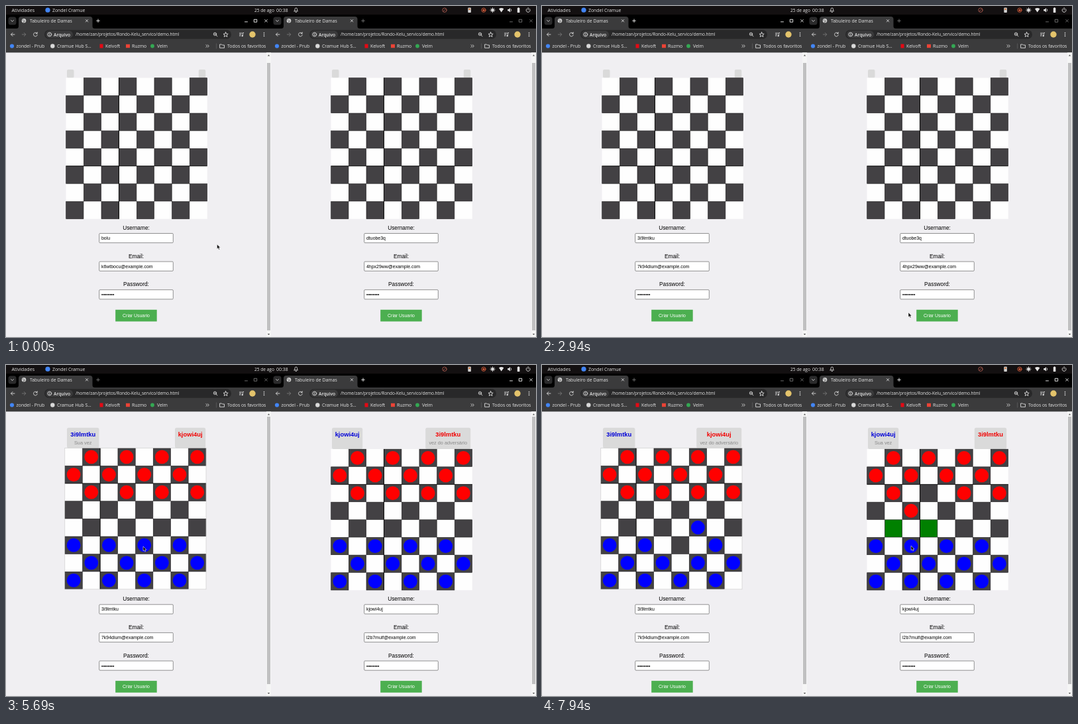
Write an HTML page that moves like this. It is 800x500 px and loops after 8000 ms.

```html
<!DOCTYPE html>
<html lang="pt">
<head>
<meta charset="utf-8">
<title>Tabuleiro de Damas</title>
<style>
  html, body { margin: 0; width: 100%; height: 100%; overflow: hidden; background: #000; }
  svg { display: block; width: 800px; height: 500px; }
  text { white-space: pre; }
  .ui { font: 6.9px "Open Sans", "Noto Sans", sans-serif; fill: #e6e6e6; }
  .page { font-family: "Liberation Sans", Arial, sans-serif; }
  .line { fill: none; stroke: #dcdcdc; stroke-width: .9; stroke-linecap: round; stroke-linejoin: round; }
</style>
</head>
<body>
<svg viewBox="0 0 800 500">
  <g id="bar"></g>
  <g id="win0"></g>
  <g id="win1" transform="translate(400 0)"></g>
  <g id="arrow"><path d="M0 0V6.9L1.6 5.5 2.7 8 4 7.4 2.9 5.1H5Z" fill="#111" stroke="#fff" stroke-width=".5"/></g>
  <g id="hand"><path d="M-.6 .3Q0-.5 .6 .3V3L3.6 3.6Q4.3 3.9 4.2 4.8L3.6 7.6H.1L-2.2 4.8Q-2.1 3.9-1.2 4.2L-.6 4.8Z" fill="#111" stroke="#fff" stroke-width=".4"/></g>
</svg>
<script>
const LOOP = 8000, STEP = 62.5, CELL = 26.65;
const $ = id => document.getElementById(id);

// When things happen, in ms
const AT = { reload0: 440, focus1: 3000, reload1: 3310, start: 4310, pick0: 6000, move: 6875, pick1: 7690 };

// Pointer stops: time, x, y
const STOPS = [
  [0, 318.5, 360], [560, 318.5, 360], [1000, 187.5, 465.5], [1690, 187.5, 465.5],
  [2430, 572, 467], [2680, 553, 463], [3690, 553, 463], [3930, 597.5, 463.5],
  [4250, 597.5, 463.5], [4680, 222, 359], [5070, 214, 300], [5700, 207, 274],
  [6250, 207, 274], [6690, 239.5, 253.5], [6900, 239.5, 253.5], [7680, 557, 273], [LOOP, 557, 273]
];

const PLAYERS = [["3i9lmtku", "7k94dium"], ["kjowi4uj", "l2b7mulf"]];
const FIRST = [["bolu", "k6wtbocu"], ["dtuobe3q", "4hpx29ww"]];

const rect = (x, y, w, h, fill, more = "") =>
  `<rect x="${x}" y="${y}" width="${w}" height="${h}" fill="${fill}" ${more}/>`;
const dot = (x, y, r, fill) => `<circle cx="${x}" cy="${y}" r="${r}" fill="${fill}"/>`;
const line = (d, more = "") => `<path class="line" d="${d}" ${more}/>`;
const ui = (x, y, s, more = "") => `<text class="ui" x="${x}" y="${y}" ${more}>${s}</text>`;
const txt = (x, y, s, size, fill, more = "") =>
  `<text class="page" x="${x}" y="${y}" font-size="${size}" fill="${fill}" ${more}>${s}</text>`;
const MID = 'text-anchor="middle"';

function topBar() {
  return rect(0, 0, 800, 13, "#131011") +
    ui(8.5, 8.8, "Atividades", 'style="font-size:7.2px"') +
    dot(63, 6.2, 3.6, "#4285f4") + ui(70, 8.8, "Zondel Cramue") +
    ui(375, 8.8, "25 de ago", 'style="font-size:6.6px"') + ui(408, 8.8, "00:38") +
    line("M435 7.8H440.5L439.6 6.4V4.6Q439.4 3 437.8 3T436 4.6V6.4ZM437 9.3H438.6") +
    `<circle class="line" cx="662" cy="6.2" r="3.2" style="stroke:#a8584c"/>` +
    line("M660.5 7.7 663.5 4.7", 'style="stroke:#a8584c"') +
    rect(697.3, 2.6, 4.6, 7.4, "#cfcfcf", 'rx=".8"') + rect(698.4, 3.7, 2.4, 2.2, "#d2763a") +
    `<circle class="line" cx="721" cy="6.2" r="3.1" style="stroke:#e0603c"/>` + dot(721, 6.2, 1.5, "#e0603c") +
    dot(734.5, 6.2, 2.2, "#e6e6e6") +
    line("M734.5 2.6V9.8M730.9 6.2H738.1M732 3.7 737 8.7M737 3.7 732 8.7") +
    `<path d="M744 4.3Q747.7 1.8 751.4 4.3L747.7 9.6Z" fill="#e6e6e6"/>` +
    `<path d="M757.2 5H758.7L760.9 3V9.5L758.7 7.5H757.2Z" fill="#e6e6e6"/>` +
    line("M762.2 4.6Q763.6 6.2 762.2 7.9") +
    rect(771.8, 3, 3.6, 7, "#e6e6e6", 'rx=".6"') + rect(772.8, 2.2, 1.6, 1, "#e6e6e6") +
    line("M786.3 3.9A3 3 0 1 0 789.9 3.9M788.1 2.6V6");
}

function browser(active) {
  const ctl = `style="stroke:${active ? "#f4f4f4" : "#777"}"`;
  let s = rect(0, 13, 400, 22, "#000") + rect(0, 34, 400, 36.3, "#3b3b3c") +
    rect(3.5, 16.5, 12, 12, "#2b2b2c", 'rx="3.5"') + line("M7.6 21.6 9.5 23.5 11.4 21.6") +
    `<path d="M15.5 34Q19 34 19 30.5V20Q19 16 23 16H126.500Q130.500 16 130.500 20V30.5Q130.500 34 134 34Z" fill="#3b3b3c"/>` +
    dot(27, 22.3, 3.3, "#d4d4d4") + line("M24.6 21.2H27.5L28.5 23.5H26L27 25", 'style="stroke:#555;stroke-width:.7"') +
    ui(36, 24.9, "Tabuleiro de Damas") +
    line("M120.3 20.6 123.7 24M123.7 20.6 120.3 24") +
    line("M136.700 22.300H141.300M139 20V24.600", ctl) +
    line("M360.500 23.900H364.500", ctl) + line("M374.700 20.300H378.700V24.300H374.700Z", ctl) +
    line("M390.700 20.600 394.300 24.200M394.300 20.600 390.700 24.200", ctl);
  // address row
  s += line("M13 43H7.600M10 40.500 7.500 43 10 45.500") +
    line("M24.300 43H29.700M27.300 40.500 29.800 43 27.300 45.500", 'style="stroke:#777"') +
    line("M46.800 41.300A2.900 2.900 0 1 0 47.300 43.700M47.200 39.700V41.700H45.200") +
    rect(58, 36.3, 282, 13.4, "#282829", 'rx="6.700"') +
    rect(60, 37.6, 41, 10.800, "#3b3b3c", 'rx="5.400"') +
    `<circle class="line" cx="65.800" cy="43" r="2.900"/>` + line("M65.800 42.800V44.500M65.800 41.400V41.500") +
    ui(72, 45.5, "Arquivo", 'font-weight="600" style="font-weight:600;font-size:6.700px"') +
    ui(105, 45.4, "/home/zan/projetos/Rondo-Kelu_servico/demo.html", 'style="font-size:6.450px"') +
    `<circle class="line" cx="315.500" cy="42.400" r="2.200"/>` + line("M317.200 44.100 319 45.900M314.600 42.400H316.400") +
    line("M331.600 39.500 332.600 42 335.200 42.200 333.200 43.900 333.900 46.500 331.600 45.100 329.300 46.500 330 43.900 328 42.200 330.600 42Z") +
    line("M352.500 41H356M352.500 43H355M352.500 45H354M357.400 45V40.500H358.700") + dot(356.700, 45.200, 1.100, "#dcdcdc") +
    dot(372, 43, 4.700, "#e3c36b") +
    [40.6, 43, 45.4].map(y => dot(389.500, y, .8, "#dcdcdc")).join("");
  // bookmarks row
  s += dot(9, 60.500, 3.100, "#4285f4") + ui(15.500, 63, "zondel - Prub") +
    dot(70.300, 60.500, 3.200, "#d9d9d9") + ui(77, 63, "Cramue Hub S…") +
    rect(141.500, 57.500, 5, 6, "#e50914") + ui(150, 63, "Kelvoft") +
    rect(181, 57.800, 6, 5.400, "#ea4335") + ui(190, 63, "Ruzmo") +
    dot(221, 60.500, 2.900, "#34a853") + ui(228, 63, "Velm") +
    line("M302 58.700 303.600 60.500 302 62.300M304.600 58.700 306.200 60.500 304.600 62.300") +
    rect(317, 56.500, .7, 8, "#606060") +
    line("M323 58H325.500L326.500 59H329.500V63.300H323Z") + ui(334, 63, "Todos os favoritos");
  return s;
}

function board(x, y, s, right) {
  const at = v => +v.toFixed(2);
  let out = rect(x, y, CELL * 8, CELL * 8, "#fefefe");
  let men = "";
  const from = right ? "2,3" : "5,4", to = right ? "3,2" : "4,5";
  const goals = right ? ["4,1", "4,3"] : ["4,3", "4,5"];
  for (let r = 0; r < 8; r++) for (let c = 0; c < 8; c++) {
    if ((r + c) % 2 === 0) continue;
    const key = r + "," + c, px = x + c * CELL, py = y + r * CELL;
    const fill = s.picked && goals.includes(key) ? "#008000" : "#434144";
    out += rect(at(px + .2), at(py + .2), CELL - .4, CELL - .4, fill, 'stroke="#1b1a1b" stroke-width=".6"');
    if (!s.started) continue;
    let color = r < 3 ? "#f00" : r > 4 ? "#00f" : "";
    if (s.moved && key === from) color = "";
    if (s.moved && key === to) color = right ? "#f00" : "#00f";
    if (color) men += dot(at(px + CELL / 2), at(py + CELL / 2), 10.4, color);
  }
  const shifted = s.started && !right;
  const vx = x + CELL * (shifted ? 2 : 3), hy = y + CELL * (s.started ? 2 : 5);
  out += rect(at(vx - .5), y, 1, CELL * 8, "#0b0b0b") + rect(x, at(hy - .4), CELL * 8, .8, "#0b0b0b");
  if (shifted) out += rect(x, y, CELL * 8, CELL * 8, "none", 'stroke="#c9c9c9" stroke-width=".6"');
  return out + men;
}

function badge(x, w, bottom, name, color, note) {
  const mid = x + w / 2;
  return rect(x, 94.7, w, bottom - 94.7, "#dadada", 'rx="2.500"') +
    txt(mid, 108, name, 9.375, color, MID + ' font-weight="bold"') +
    (note ? txt(mid, 120.200, note, 7.300, "#8a8a8a", MID) : "");
}

function page(i, s) {
  const dy = s.started ? 18.3 : 0;
  const bx = s.started && !i ? 88.8 : 90.5, by = !s.started ? 108.5 : i ? 127 : 125.6;
  let out = rect(0, 70.300, 400, 430, "#f0eff2");
  if (s.started) {
    const mine = PLAYERS[i][0], other = PLAYERS[1 - i][0];
    const myTurn = s.moved === !!i;
    const w = [48.4, 46.2];
    const ow = myTurn ? w[1 - i] : 68;
    out += badge(92, w[i], by, mine, "#0000d8", myTurn && "Sua vez") +
      badge(301.200 - ow, ow, by, other, "#f20000", !myTurn && "vez do adversário");
  } else {
    out += rect(92, 96, 10.500, 12.500, "#dadada", 'rx="2"') + rect(290.800, 96, 10.500, 12.500, "#dadada", 'rx="2"');
  }
  out += board(bx, by, s, i);
  const [user, mail] = s.fresh ? PLAYERS[i] : FIRST[i];
  [["Username:", user], ["Email:", mail + "@example.com"], ["Password:", "••••••••"]].forEach(([label, value], n) => {
    const y = 343.500 + n * 42.600 + dy;
    out += txt(196.500, y - 5.400, label, 8.333, "#000", MID) +
      rect(140.700, y, 111.600, 14.200, "#fff", 'rx="1.200" stroke="#767676" stroke-width=".8"') +
      txt(144, y + 9.500, value, 6.940, "#000");
  });
  out += rect(165.200, 458.800 + dy, 62.500, 17.700, s.hover ? "#45a049" : "#4caf50") +
    txt(196.500, 470.100 + dy, "Criar Usuario", 6.940, "#fff", MID);
  out += rect(393, 70.300, 7, 429.700, "#f5f5f5") +
    rect(394, s.started ? 78 : 86, 5, 404, "#c0c0c1") +
    `<path d="M394.800 75.500 396.500 73.500 398.200 75.500Z" fill="#505050"/>` +
    `<path d="M394.800 495 396.500 497 398.200 495Z" fill="#505050"/>`;
  return out;
}

function pointer(t) {
  let k = 1;
  while (k < STOPS.length - 1 && STOPS[k][0] < t) k++;
  const [t0, x0, y0] = STOPS[k - 1], [t1, x1, y1] = STOPS[k];
  const p = Math.min(1, Math.max(0, (t - t0) / (t1 - t0))), e = p * p * (3 - 2 * p);
  return [x0 + (x1 - x0) * e, y0 + (y1 - y0) * e];
}

function windowState(i, t, x, y) {
  const started = t >= AT.start, dy = started ? 18.3 : 0, lx = x - 400 * i;
  const rightActive = (t >= AT.focus1 && t < AT.pick0) || t >= AT.pick1;
  return {
    started,
    active: rightActive === !!i,
    fresh: t >= (i ? AT.reload1 : AT.reload0),
    moved: t >= AT.move,
    picked: i ? t >= AT.pick1 : t >= AT.pick0 && t < AT.move,
    hover: lx >= 165 && lx <= 228 && y >= 458.8 + dy && y <= 476.5 + dy
  };
}

const drawn = ["", ""];
function draw(now) {
  const t = Math.floor((now % LOOP) / STEP) * STEP;
  const [x, y] = pointer(t);
  let over = false;
  for (let i = 0; i < 2; i++) {
    const s = windowState(i, t, x, y), key = JSON.stringify(s);
    over = over || s.hover;
    if (key !== drawn[i]) {
      $("win" + i).innerHTML = browser(s.active) + page(i, s);
      drawn[i] = key;
    }
  }
  for (const id of ["arrow", "hand"]) {
    $(id).setAttribute("transform", `translate(${x.toFixed(1)} ${y.toFixed(1)})`);
    $(id).style.display = (id === "hand") === over ? "" : "none";
  }
}

$("bar").innerHTML = topBar();
const begin = performance.now();
function tick() {
  draw(performance.now() - begin);
  requestAnimationFrame(tick);
}
tick();
</script>
</body>
</html>
```
